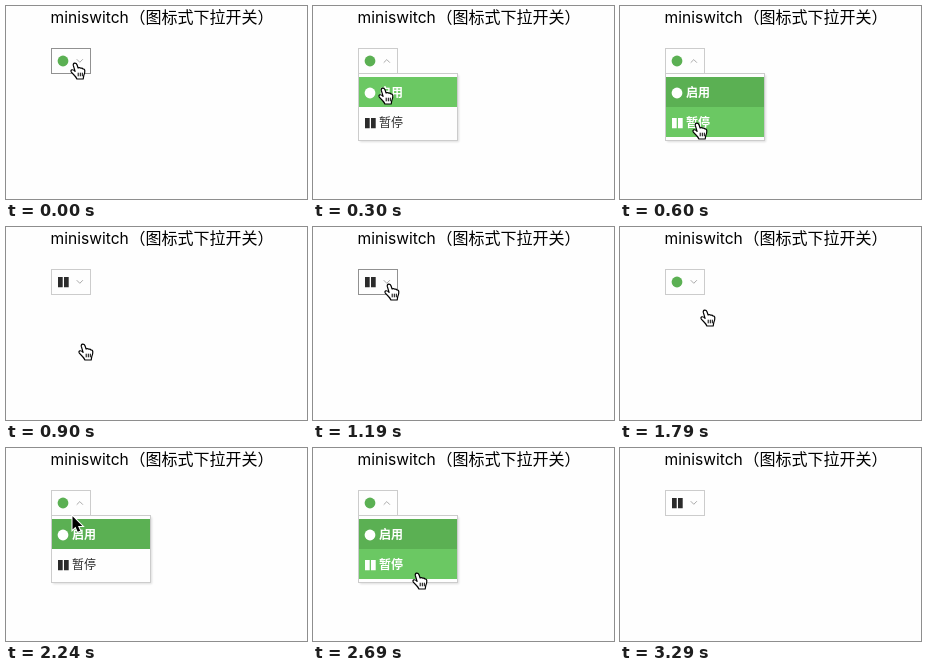
An HTML page that plays this animation: 301 by 193 pixels, repeating every 3810 ms.

```html
<!DOCTYPE html>
<html lang="zh">
<head>
<meta charset="utf-8">
<title>miniswitch</title>
<style>
  html, body { margin: 0; width: 100%; height: 100%; overflow: hidden; background: #fefefe; }
  svg { display: block; width: 301px; height: 193px; }
  text { font-family: "Noto Sans CJK SC", "Noto Sans CJK", sans-serif; }

  svg {
    --green: #5bb053;
    --hover: #6bc863;
    --ink: #2b2b2b;
  }
  .title { font-size: 16px; }
  .latin { font-family: Inter, sans-serif; font-size: 15.6px; }
  .label { font-size: 12px; fill: currentColor; }
  .icon { fill: currentColor; }

  /* Every state change is a hard cut on one shared clock. */
  .anim { animation: 3810ms step-end infinite; }
  .button { animation-name: focus; }
  .menu, .up { animation-name: open; }
  .down { animation-name: closed; }
  .on { animation-name: enabled; }
  .off { animation-name: paused; }
  .first { animation-name: first-row; }
  .second { animation-name: second-row; }
  .second-text { animation-name: second-text; }
  .pointer { animation-name: move; }
  .hand { animation-name: hand; }
  .arrow { animation-name: arrow; }

  @keyframes focus {
    0%, 31.233%, 50.918% { stroke: #919191; }
    7.874%, 39.107%, 58.792%, 100% { stroke: #ccc; }
  }
  @keyframes open {
    0%, 23.622%, 46.981%, 82.414%, 100% { visibility: hidden; }
    3.937%, 39.107%, 58.792% { visibility: visible; }
  }
  @keyframes closed {
    0%, 23.622%, 46.981%, 82.414%, 100% { visibility: visible; }
    3.937%, 39.107%, 58.792% { visibility: hidden; }
  }
  @keyframes enabled {
    0%, 46.981% { visibility: visible; }
    23.622%, 82.414%, 100% { visibility: hidden; }
  }
  @keyframes paused {
    0%, 46.981% { visibility: hidden; }
    23.622%, 82.414%, 100% { visibility: visible; }
  }
  @keyframes first-row {
    0%, 15.748%, 46.981%, 100% { fill: var(--green); }
    7.874%, 39.107% { fill: var(--hover); }
  }
  @keyframes second-row {
    0%, 46.981%, 100% { fill: #fefefe; }
    15.748%, 70.603% { fill: var(--hover); }
    39.107% { fill: var(--green); }
  }
  @keyframes second-text {
    0%, 46.981%, 100% { color: var(--ink); font-weight: 400; }
    15.748%, 70.603% { color: #fff; font-weight: 700; }
  }
  @keyframes move {
    0% { transform: translate(64px, 56px); }
    7.874% { transform: translate(65px, 81px); }
    11.811% { transform: translate(69px, 94px); }
    15.748% { transform: translate(72px, 116px); }
    27.296% { transform: translate(73px, 78px); }
    31.233% { transform: translate(71px, 56px); }
    39.107% { transform: translate(80px, 82px); }
    50.918% { transform: translate(64px, 61px); }
    54.855% { transform: translate(61px, 54px); }
    58.792% { transform: translate(65px, 67px); }
    62.729% { transform: translate(99px, 143px); }
    66.666% { transform: translate(100px, 141px); }
    70.603% { transform: translate(99px, 124px); }
    82.414%, 100% { transform: translate(127px, 152px); }
  }
  @keyframes hand {
    0%, 70.603% { visibility: visible; }
    58.792%, 82.414%, 100% { visibility: hidden; }
  }
  @keyframes arrow {
    0%, 70.603%, 86.351%, 100% { visibility: hidden; }
    58.792%, 82.414% { visibility: visible; }
  }
</style>
</head>
<body>
<svg viewBox="0 0 301 193">
  <defs>
    <path id="bars" d="M0 0h4.7v10.3h-4.7zM6 0h4.7v10.3h-4.7z"/>
    <filter id="soft" x="-10%" y="-10%" width="120%" height="120%">
      <feGaussianBlur stdDeviation=".8"/>
    </filter>
  </defs>

  <g class="title">
    <text class="latin" x="44.5" y="17">miniswitch</text>
    <text x="123.5" y="17">（图标式下拉开关）</text>
  </g>

  <rect class="anim button" x="45.5" y="42.5" width="39" height="25" fill="#fefefe"/>
  <circle class="anim on" cx="57" cy="55" r="5.4" fill="var(--green)"/>
  <use class="anim off" href="#bars" x="52" y="50" fill="var(--ink)"/>
  <g fill="none" stroke="#aaa">
    <path class="anim down" d="M70.7 53.2l3.1 3.1 3.1-3.1"/>
    <path class="anim up" d="M70.7 56.7l3.1-3.1 3.1 3.1"/>
  </g>

  <g class="anim menu">
    <rect x="47" y="69" width="99" height="67" fill="#000" opacity=".13" filter="url(#soft)"/>
    <rect x="45.5" y="67.5" width="99" height="67" fill="#fefefe" stroke="#ccc"/>
    <rect class="anim first" x="46" y="71" width="98" height="30"/>
    <rect class="anim second" x="46" y="101" width="98" height="30"/>
    <g color="#fff" font-weight="700">
      <circle class="icon" cx="57" cy="87" r="5.4"/>
      <text class="label" x="66" y="91">启用</text>
    </g>
    <g class="anim second-text">
      <use class="icon" href="#bars" x="52" y="112"/>
      <text class="label" x="66" y="121">暂停</text>
    </g>
  </g>

  <g class="anim pointer">
    <g class="anim hand" fill="#fff" stroke="#000" stroke-width="1.2" stroke-linejoin="round">
      <path d="M3.3 3.4Q3 1.4 4.6 1.2 6.3 1 7 2.8L8.1 6Q9.6 5.1 10.7 6.2 12.3 5.6 12.9 6.9 14.7 6.8 14.8 8.9 14.9 11.5 13.8 13.5L13.2 17H6.9Q6.2 15.2 4.5 13.5L1.3 10.1Q.4 8.2 1.8 7.8 3.3 7.5 5.1 9.4Z"/>
      <path d="M8.2 10.7v3.6M10.3 10.7v3.6M12.3 10.7v3.6" stroke-width="1"/>
    </g>
    <path class="anim arrow" d="M1.5 1.2V14.6L4.5 11.8 6.7 16.8 9.2 15.7 7 10.9H11.3Z" stroke="#fff" paint-order="stroke" stroke-width="2"/>
  </g>
</svg>
</body>
</html>
```
